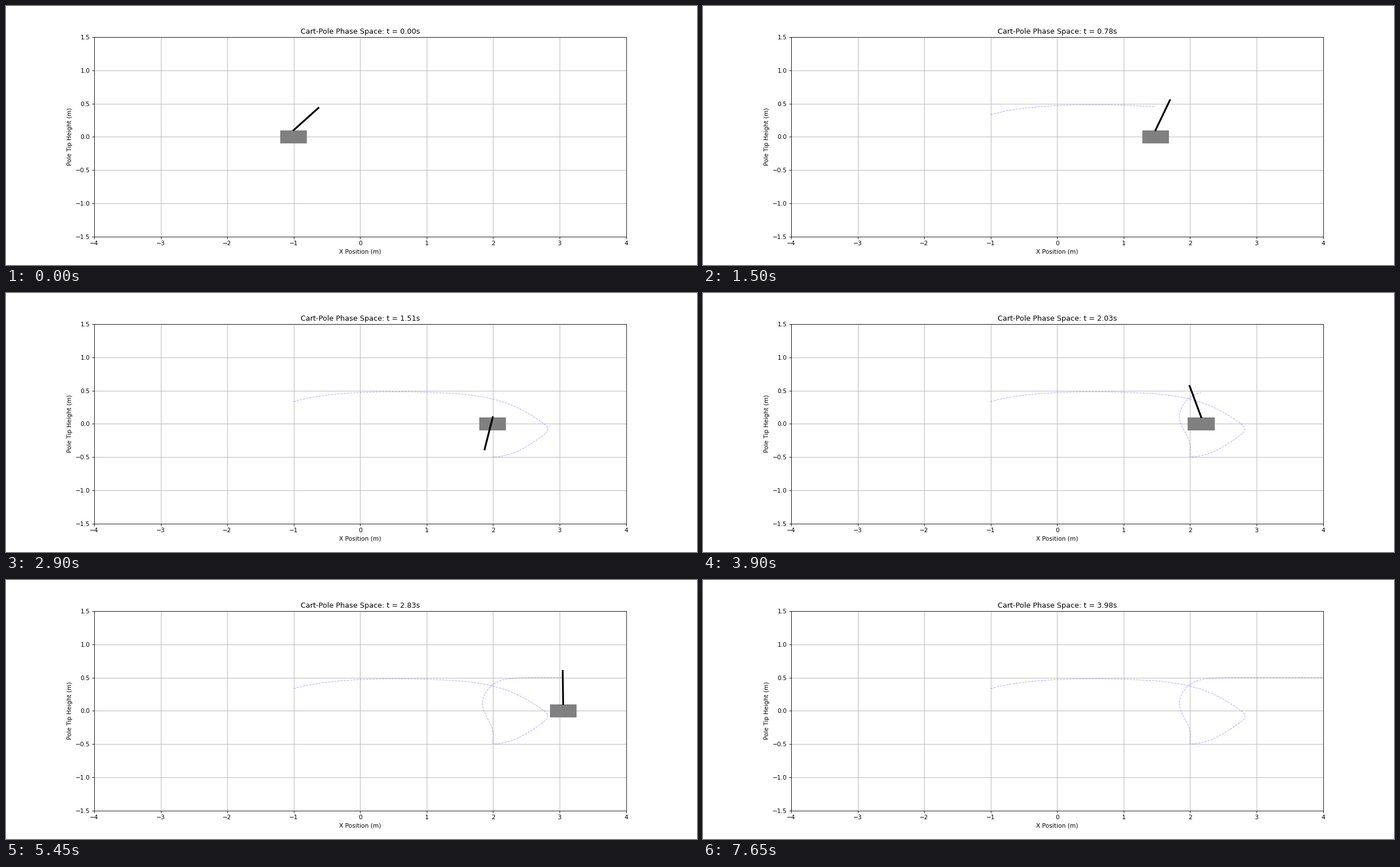
Animation of 1222 by 458 pixels, one loop 7700 ms. Source, as a matplotlib script:

```python
import numpy as np
import matplotlib.pyplot as plt
from matplotlib.animation import FuncAnimation
from matplotlib.patches import Rectangle

FRAMES, INTERVAL, DT = 154, 50, 0.026
CART_W, CART_H, POLE = 0.4, 0.2, 0.5
DECAY = 0.1048       # rate at which the pole settles upright, per step

# cart pushes: step, change of speed (m per step), duration
PUSHES = [(46.28, -0.1684, 0.5), (57.36, 0.0902, 0.3),
          (60.8, -0.0732, 0.5), (64.46, 0.09325, 1.0)]

# pole angle from upright (rad) at a few steps of the swing
SWING = np.array([(0, 0.839), (4, 0.643), (10, 0.424), (19.5, 0.273),
                  (26, 0.352), (32, 0.522), (40, 1.043), (45, 1.58),
                  (48, 1.935), (52.7, 2.548), (57, 3.16), (58.5, 3.515),
                  (60, 3.941)])


def ramp(s, start, width):
    """Zero before start, slope one after it, with a rounded corner."""
    return width * np.logaddexp(0, (s - start) / width)


def hermite(s, knots, values):
    slopes = np.gradient(values, knots)
    i = np.clip(np.searchsorted(knots, s, side="right") - 1, 0, len(knots) - 2)
    h = knots[i + 1] - knots[i]
    u = (s - knots[i]) / h
    return ((1 + 2 * u) * (1 - u) ** 2 * values[i]
            + u * (1 - u) ** 2 * h * slopes[i]
            + u ** 2 * (3 - 2 * u) * values[i + 1]
            + u ** 2 * (u - 1) * h * slopes[i + 1])


steps = np.arange(FRAMES)
cart_x = -1 + 0.08677 * steps - 0.125 * (1 - np.exp(-steps / 7))
cart_x += sum(dv * ramp(steps, start, width) for start, dv, width in PUSHES)

knots, angles = SWING.T
settle = knots[-1]
swing = hermite(np.minimum(steps, settle), knots, angles)
theta = 2 * np.pi + (swing - 2 * np.pi) * np.exp(-DECAY * np.maximum(steps - settle, 0))
tip_height = POLE * np.cos(theta)

fig, ax = plt.subplots(figsize=(16, 5.997), dpi=76.375)   # 1222 x 458 px
ax.set_xlim(-4, 4)
ax.set_ylim(-1.5, 1.5)
ax.set_aspect("equal")
ax.grid(True)
ax.set_xlabel("X Position (m)")
ax.set_ylabel("Pole Tip Height (m)")
title = ax.set_title("")

cart = ax.add_patch(Rectangle((0, -CART_H / 2), CART_W, CART_H,
                              fc="gray", ec="none", zorder=2))
pole, = ax.plot([], [], "k-", lw=3)
trail, = ax.plot([], [], "b--", lw=1, alpha=0.3)


def update(i):
    x, top = cart_x[i], CART_H / 2
    cart.set_x(x - CART_W / 2)
    pole.set_data([x, x + POLE * np.sin(theta[i])], [top, top + tip_height[i]])
    trail.set_data(cart_x[:i + 1], tip_height[:i + 1])
    title.set_text(f"Cart-Pole Phase Space: t = {i * DT:.2f}s")
    return cart, pole, trail, title


anim = FuncAnimation(fig, update, frames=FRAMES, interval=INTERVAL,
                     repeat=True, repeat_delay=0, blit=False)
plt.show()
```
